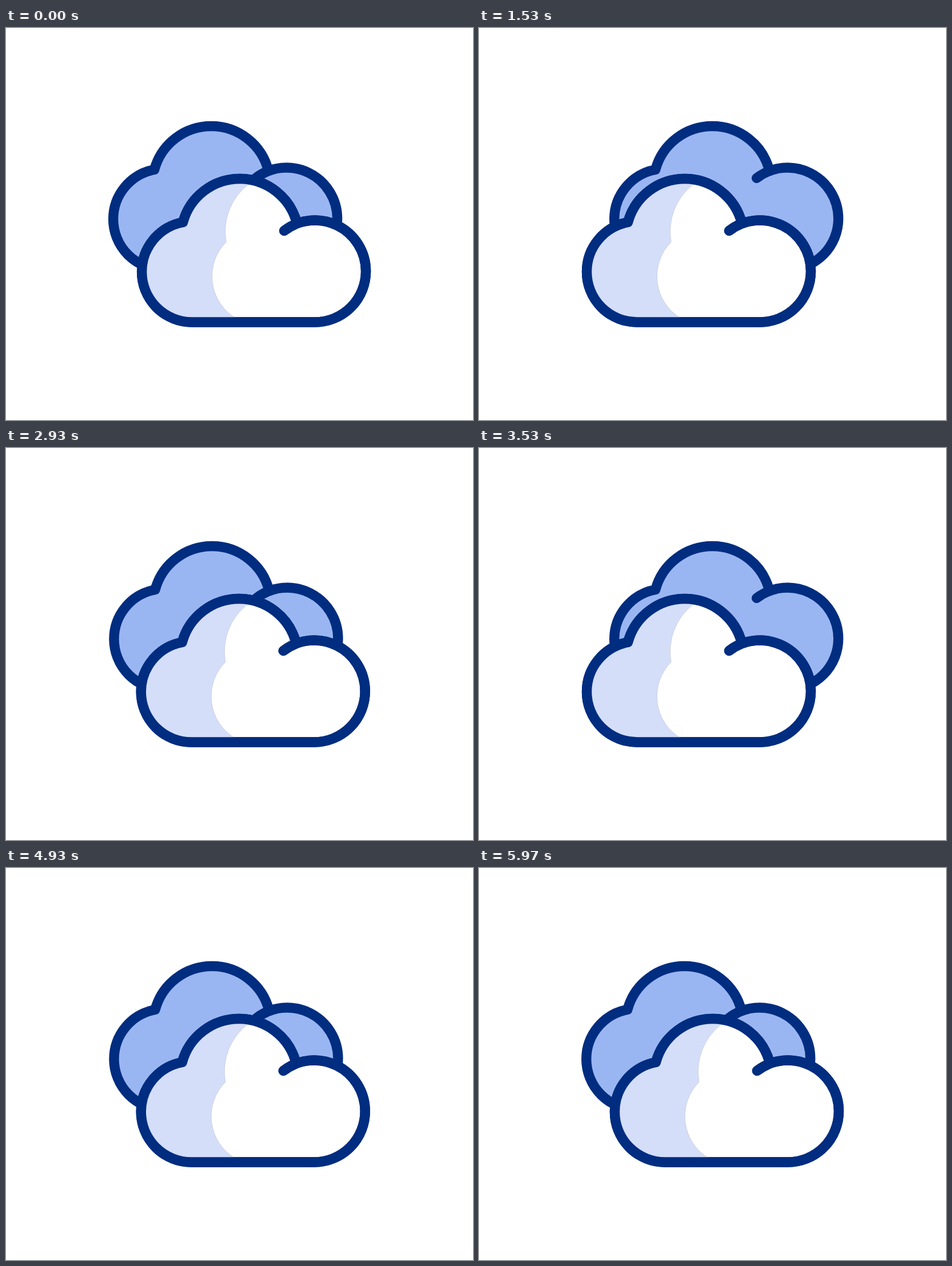
Write an HTML page that moves like this. It is 817x685 px and loops after 6.01 s.

```html
<!DOCTYPE html>
<html lang="en">
<head>
<meta charset="utf-8">
<title>Drifting clouds</title>
<style>
  html, body { margin: 0; width: 100%; height: 100%; overflow: hidden; background: #fff; }
  svg { display: block; width: 100%; height: 100%; }
  .outline { stroke: #002d80; stroke-width: 17.4; stroke-linecap: round; stroke-linejoin: round; }
</style>
</head>
<body>
<svg viewBox="0 0 817 685">
  <defs>
    <path id="cloud" class="outline" d="M53 354.3A89 89 0 0 1 196 425A89 89 0 0 1 107 514H-108A88 88 0 0 1 -196 426A88 88 0 0 1 -124 339.5A103 103 0 0 1 -24.5 263.5A103 103 0 0 1 75.5 341.8"/>
    <path id="shade" d="M-9.5 273A105 105 0 0 0 -48.5 374A85 85 0 0 0 -30 508V514H-108A88 88 0 0 1 -196 426A88 88 0 0 1 -124 339.5A103 103 0 0 1 -24.5 263.5H-9.5Z"/>
  </defs>
  <g id="back"><use href="#cloud" fill="#9ab6f2"/></g>
  <g id="front">
    <use href="#cloud" fill="#fff"/>
    <use href="#shade" fill="#d4def9" stroke="#c6cad4" stroke-width=".8"/>
    <use href="#cloud" fill="none"/>
  </g>
</svg>
<script>
const LOOP = 6010, CYCLE = 25;
const AXIS = 408.6, APART = 25, CROSSED = -32;
const TURN = 9.8; // steps spent crossing over, the rest is the way back
const back = document.getElementById('back');
const front = document.getElementById('front');

// Five picture steps per 200 ms, the first one held longer.
function stepAt(ms) {
  const block = Math.min(29, Math.floor(ms / 200));
  const rest = ms - block * 200;
  return block * 5 + [70, 100, 130, 170].filter(limit => rest >= limit).length;
}

function snap(u) {
  const rise = u ** 3.9;
  return rise / (rise + (1 - u) ** 2.3);
}

const glide = u => (1 - Math.cos(Math.PI * u)) / 2;
const mix = (a, b, k) => a + (b - a) * k;

function offsetAt(step) {
  const s = (step + 0.5) % CYCLE;
  return s < TURN
    ? mix(APART, CROSSED, snap(s / TURN))
    : mix(CROSSED, APART, glide((s - TURN) / (CYCLE - TURN)));
}

function draw(ms) {
  const offset = offsetAt(stepAt(ms % LOOP));
  front.setAttribute('transform', `translate(${AXIS + offset} 0)`);
  back.setAttribute('transform', `translate(${AXIS - offset} -92)`);
}

const start = performance.now();
function tick() {
  draw(performance.now() - start);
  requestAnimationFrame(tick);
}
tick();
</script>
</body>
</html>
```
